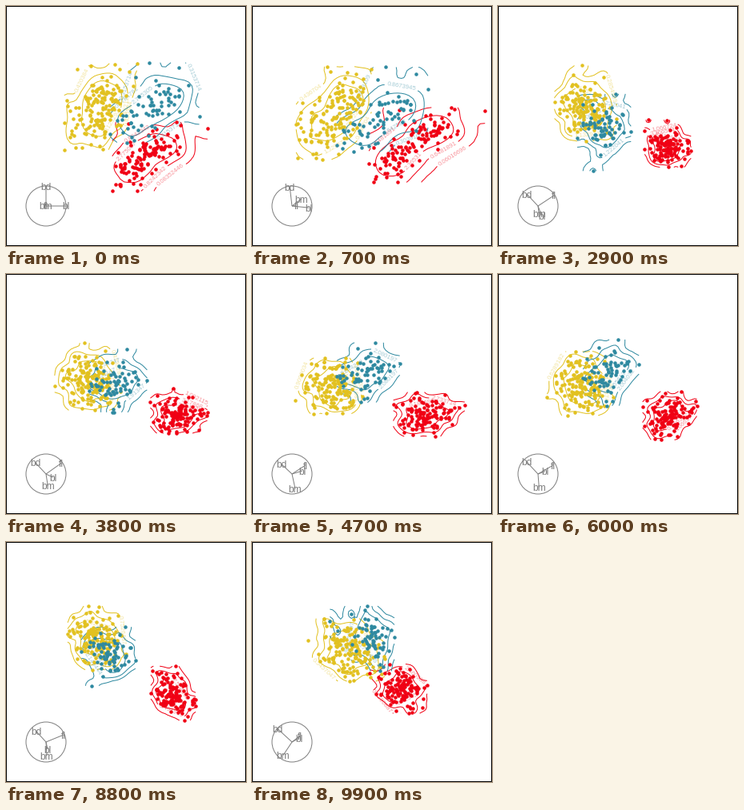
These frames come from a looping animation (300 by 300 pixels, 10000 ms). A matplotlib script:

```python
import numpy as np
import matplotlib.pyplot as plt
from matplotlib.animation import FuncAnimation
from matplotlib.collections import LineCollection

FRAMES, STEP = 100, 100
PX = 1 / 150            # one pixel in plot units
PT = 0.72               # one pixel in points
REACH = 4.225           # distance that maps to the stage edge
GREY = "#7f7f7f"
NAMES = ["bl", "bd", "fl", "bm"]
MEAN = np.array([43.92, 17.15, 200.9, 4202])
SD = np.array([5.46, 1.975, 14.06, 802])

# colour, size, strength of the shared size factor, mean, sd, stray points
GROUPS = [
    ("#e2c120", 151, .62, [38.79, 18.35, 189.95, 3701], [2.66, 1.22, 6.54, 458],
     [(46, 21.5, 194, 4200), (34.6, 21.1, 198, 4400), (32.1, 15.5, 188, 3050)]),
    ("#f00014", 123, .83, [47.5, 14.98, 217.2, 5076], [3.08, .98, 6.48, 504],
     [(59.6, 17, 230, 6050), (54.3, 15.7, 231, 5650), (44.4, 17.3, 219, 5250)]),
    ("#2e89a0", 68, .76, [48.83, 18.42, 195.8, 3733], [3.34, 1.135, 7.13, 384],
     [(58, 17.8, 181, 3700), (50.3, 20, 197, 3300), (40.9, 16.6, 187, 3200)]),
]

# time step: x weights, y weights of the four variables
POSES = {
    0: [(1, 0, 0, 0), (0, 1, 0, 0)],
    14: [(.45, -.37, .36, .73), (-.33, .74, 0, .56)],
    23: [(.32, -.40, .75, .40), (-.43, .75, .38, .25)],
    29: [(.18, -.55, .82, .04), (-.48, .58, .54, -.36)],
    47: [(.52, -.52, .68, .16), (.16, .48, .44, -.74)],
    50: [(.62, -.45, .60, .20), (.27, .50, .37, -.75)],
    72: [(-.04, -.60, .76, -.12), (-.04, .72, .48, -.52)],
    88: [(.08, -.48, .88, .04), (-.36, .52, .36, -.68)],
    99: [(.36, -.72, .40, -.44), (.20, .68, .32, -.68)],
}
KEYS = list(POSES)
BASES = [np.transpose(p) for p in POSES.values()]


def sample(rng, n, load, mean, sd, strays):
    """Small and large half of a group, spread along one shared factor."""
    n -= len(strays)
    z = np.clip(rng.normal(size=(n, 5)), -2.3, 2.3)
    z[:, 0] = 0.9 * np.resize([1, -1], n) + 0.44 * z[:, 0]
    z -= z.mean(0)
    w, v = np.linalg.eigh(np.cov(z.T))
    z = z @ (v / np.sqrt(w)) @ v.T
    rows = mean + sd * (load * z[:, :1] + np.sqrt(1 - load ** 2) * z[:, 1:])
    return (np.vstack([rows, strays]) - MEAN) / SD


def basis(i):
    k = min(np.searchsorted(KEYS, i, side="right"), len(KEYS) - 1)
    t = (i - KEYS[k - 1]) / (KEYS[k] - KEYS[k - 1])
    u, _, vt = np.linalg.svd((1 - t) * BASES[k - 1] + t * BASES[k],
                             full_matrices=False)
    return u @ vt


def kernel(v):
    """Grid over the data range and the normal kernel of every point on it."""
    q1, q3 = np.percentile(v, [25, 75])
    h = 1.06 * min(v.std(ddof=1), (q3 - q1) / 1.34) * len(v) ** -0.2
    g = np.linspace(v.min(), v.max(), 25)
    d = (g[:, None] - v) / h
    return g, np.exp(-d * d / 2) / (h * np.sqrt(2 * np.pi))


def split(line, width):
    """Cut a gap for a label out of the flattest stretch of a line."""
    s = np.r_[0, np.cumsum(np.hypot(*np.diff(line, axis=0).T))]
    if s[-1] < 1.35 * width:
        return [line], None

    def at(d):
        return np.column_stack([np.interp(d, s, line[:, 0]),
                                np.interp(d, s, line[:, 1])])

    starts = np.linspace(0.05, 0.95, 40) * (s[-1] - width)
    a, b = at(starts), at(starts + width)
    best = np.argmax(np.hypot(*(b - a).T))
    a, b, lo = a[best], b[best], starts[best]
    mid = (a + b + 2 * at([lo + width / 2])[0]) / 4
    dx, dy = b - a
    angle = (np.degrees(np.arctan2(dy, dx)) + 90) % 180 - 90
    parts = [np.vstack([line[s < lo], a]), np.vstack([b, line[s > lo + width]])]
    return parts, (mid, angle)


rng = np.random.default_rng(7)
CLOUDS = [(g[0], sample(rng, *g[1:])) for g in GROUPS]

fig = plt.figure(figsize=(3, 3), dpi=100, facecolor="white")
ax = fig.add_axes([0, 0, 1, 1])
ax.set(xlim=(-1, 1), ylim=(-1, 1))
ax.axis("off")
ax.set_autoscale_on(False)
ax.add_patch(plt.Rectangle((-1 + PX / 2, -1 + PX / 2), 2 - PX, 2 - PX,
                           fill=False, ec="black", lw=PT, snap=False))

HUB = np.array([-2 / 3, -2 / 3])
ax.add_patch(plt.Circle(HUB, 1 / 6, fill=False, ec=GREY, lw=PT))
spokes = LineCollection([], colors=GREY, linewidths=PT, zorder=2, snap=False)
ax.add_collection(spokes, autolim=False)
tips = [ax.text(0, 0, n, color=GREY, family="Liberation Sans", size=12 * PT,
                ha="center", va="center_baseline") for n in NAMES]

curves, dots = [], []
for n, (color, _) in enumerate(CLOUDS):
    curve = LineCollection([], colors=color, linewidths=PT, zorder=2)
    ax.add_collection(curve, autolim=False)
    curves.append(curve)
    dots += ax.plot([], [], "o", color=color, ms=4.5 * PT, mew=0, zorder=4 + n)
labels = []


def draw(i):
    b = basis(i)
    ends = HUB + b / 6
    spokes.set_segments([[HUB, e] for e in ends])
    for tip, e in zip(tips, ends):
        tip.set_position(e)
    while labels:
        labels.pop().remove()
    for (color, cloud), curve, dot in zip(CLOUDS, curves, dots):
        x, y = (cloud @ b / REACH).T
        dot.set_data(x, y)
        gx, kx = kernel(x)
        gy, ky = kernel(y)
        z = ky @ kx.T / len(x)
        levels = np.quantile(z, [.25, .5, .75])
        cs = ax.contour(gx, gy, z, levels)
        segs = cs.allsegs
        cs.remove()
        parts = []
        for level, lines in zip(levels, segs):
            text = f"{level:.7g}"
            for line in lines:
                if len(line) < 2:
                    continue
                cut, spot = split(line, (4.4 * len(text) + 3) * PX)
                parts += cut
                if spot:
                    labels.append(ax.text(
                        *spot[0], text, rotation=spot[1], color=color,
                        alpha=0.42, family="Liberation Sans", size=7.8 * PT,
                        ha="center", va="center", zorder=3))
        curve.set_segments([p for p in parts if len(p) > 1])
    return []


anim = FuncAnimation(fig, draw, frames=FRAMES, interval=STEP, repeat=True,
                     repeat_delay=0, blit=False)
plt.show()
```
